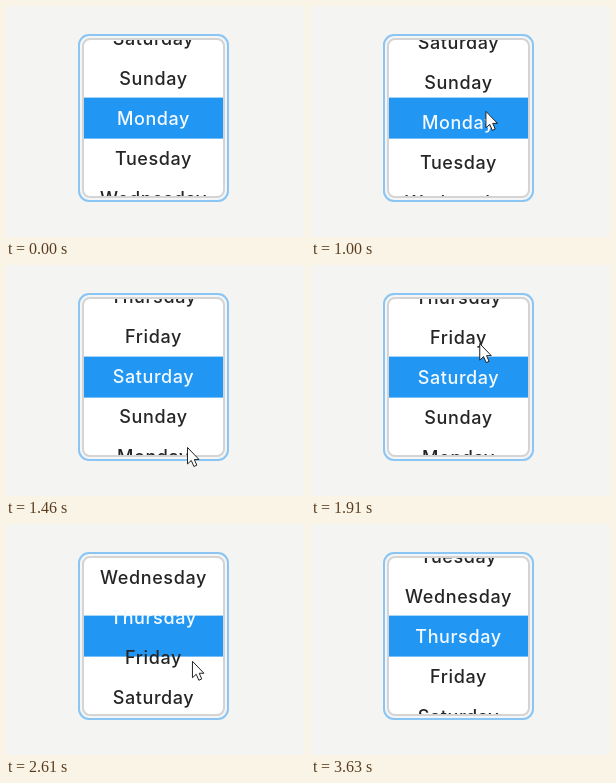
Animation of 299x231 px, one loop 3930 ms. Source, as an HTML page:

```html
<!DOCTYPE html>
<html lang="en">
<head>
<meta charset="utf-8">
<title>Weekday picker</title>
<style>
  html, body { margin: 0; width: 100%; height: 100%; overflow: hidden; background: #f4f4f2; }
  svg { display: block; width: 100%; height: 100%; }
  text { font: 500 18px Inter, "Open Sans", sans-serif; letter-spacing: .6px; text-anchor: middle; }
</style>
</head>
<body>
<svg viewBox="0 0 299 231">
  <clipPath id="window"><rect x="78" y="34" width="139" height="156" rx="6"/></clipPath>
  <rect x="73" y="29" width="149" height="166" rx="10" fill="#f4f5f6" stroke="#8ac5f4" stroke-width="2"/>
  <rect x="77" y="33" width="141" height="158" rx="7" fill="#fff" stroke="#d4d4d4" stroke-width="2"/>
  <g clip-path="url(#window)">
    <rect x="78" y="91.6" width="139" height="41" fill="#2196f3"/>
    <g id="list"></g>
  </g>
  <path id="cursor" d="M0 0V16.5L3.8 13L6.4 19L9.3 17.7L6.8 12H11.5Z" fill="#fff" stroke="#222" stroke-linejoin="round"/>
</svg>
<script>
const LOOP = 3930, TICK = 76.6, ROW = 40, CENTER = 112;
const DAYS = ["Sunday", "Monday", "Tuesday", "Wednesday", "Thursday", "Friday", "Saturday"];
const list = document.getElementById("list");
const cursor = document.getElementById("cursor");

const out = u => 1 - (1 - u) ** 2;
const smooth = u => u * u * (3 - 2 * u);
const mix = (a, b, u) => a + (b - a) * u;

// The pointer enters, pulls the list down, goes back up, pulls twice more and leaves
const START = { x: 237, y: 217, scroll: 0 };
const MOVES = [
  { from: 460, to: 850, x: 175, y: 101, scroll: 0, ease: out },
  { from: 915, to: 1460, x: 182, y: 183, scroll: 80, ease: smooth },
  { from: 1460, to: 1990, x: 169, y: 77, scroll: 80, ease: out },
  { from: 2065, to: 2300, x: 184, y: 126, scroll: 128.5, ease: smooth },
  { from: 2375, to: 2840, x: 190, y: 150, scroll: 155, ease: smooth },
  { from: 2950, to: 3530, x: 254, y: 226, scroll: 160, ease: smooth },
];

function pose(t) {
  let { x, y, scroll } = START;
  for (const m of MOVES) {
    const u = m.ease(Math.min(1, Math.max(0, (t - m.from) / (m.to - m.from))));
    x = mix(x, m.x, u);
    y = mix(y, m.y, u);
    scroll = mix(scroll, m.scroll, u);
  }
  return { x, y, scroll };
}

const rows = [];
for (let k = -2; k <= 6; k++) {
  const label = document.createElementNS("http://www.w3.org/2000/svg", "text");
  label.textContent = DAYS[(15 - k) % 7];
  label.setAttribute("x", 147.5);
  list.append(label);
  rows.push({ k, label });
}

function draw(time) {
  const t = Math.floor((time % LOOP + 6) / TICK) * TICK;
  const { x, y, scroll } = pose(t);
  const selected = Math.round(scroll / ROW);
  for (const { k, label } of rows) {
    label.setAttribute("y", CENTER + 6.5 + scroll - ROW * k);
    label.setAttribute("fill", k === selected ? "#f4faff" : "#252525");
  }
  cursor.setAttribute("transform", `translate(${x - .5} ${y - .5})`);
  cursor.setAttribute("visibility", t > 450 && t < 3590 ? "visible" : "hidden");
}

const start = performance.now();
function loop() {
  draw(performance.now() - start);
  requestAnimationFrame(loop);
}
loop();
</script>
</body>
</html>
```
